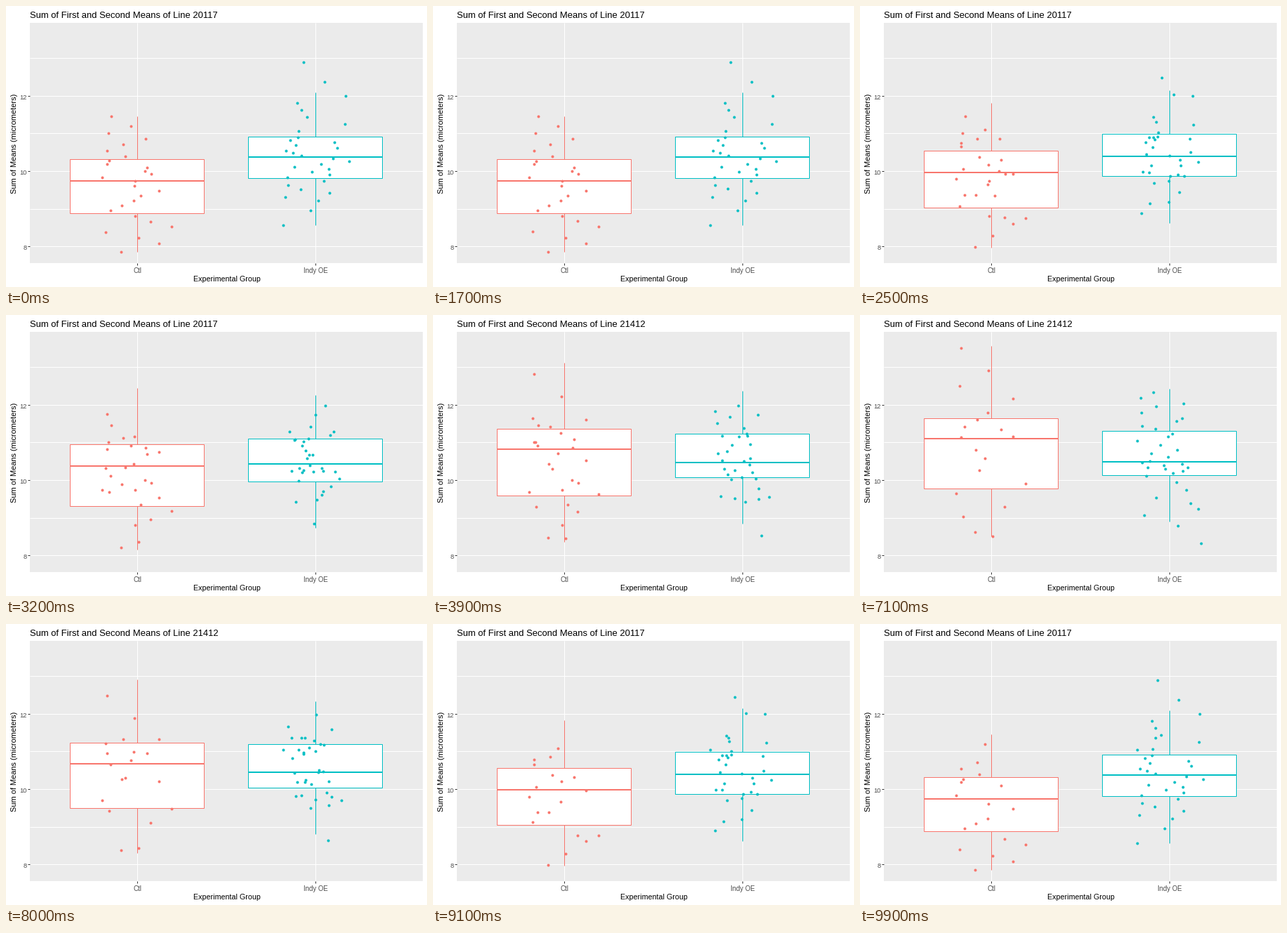
Animation of 600 by 400 pixels, one loop 10 s. Source, as a matplotlib script:

```python
import numpy as np
import matplotlib.pyplot as plt
from matplotlib.animation import FuncAnimation
from matplotlib.patches import Rectangle

W, H, DPI = 600, 400, 100
PX = 72 / DPI  # one pixel in points
FRAMES, INTERVAL = 100, 100
RED, TEAL, DARK, GREY = "#F8766D", "#00BFC4", "#333333", "#4D4D4D"
LINES = (20117, 21412)
JITTER = 50

# Pixel heights: reach, whisker, quartile, median, quartile, whisker, reach
SHARE = (0, 0.05, 0.25, 0.5, 0.75, 0.95, 1)
CTL = ((157, 175, 218, 249, 295, 335, 350),
       (40, 70, 144, 173, 245, 309, 314))
INDY = ((80, 123, 186, 215, 245, 280, 312),
        (104, 121, 164, 209, 227, 293, 327))

plt.rcParams["font.family"] = "Liberation Sans"
rng = np.random.default_rng(20)

fig = plt.figure(figsize=(W / DPI, H / DPI), dpi=DPI, facecolor="white")
ax = fig.add_axes([0, 0, 1, 1])
ax.set_xlim(0, W)
ax.set_ylim(H, 0)
ax.axis("off")


def line(xs, ys, color, width=1, z=1):
    return ax.plot(xs, ys, color=color, lw=width * PX, zorder=z,
                   solid_capstyle="butt")[0]


def label(x, y, s, size, color="black", **kw):
    return ax.text(x, y, s, fontsize=size * PX, color=color, **kw)


def mix(a, b, s):
    return a + (b - a) * s


def cloud(x, levels, jitter):
    """Points spread over the levels by quantile, in shuffled order."""
    share = np.linspace(0, 1, len(jitter))
    y = rng.permutation(np.interp(share, SHARE, levels))
    return np.column_stack([x + jitter, y])


class Group:
    """Box plot with its points, blending between two states."""

    def __init__(self, x, color, levels, whiskers, jitters):
        left, right = x - 96, x + 95
        self.points = [cloud(x, v, j) for v, j in zip(levels, jitters)]
        self.shared = min(map(len, jitters))
        self.levels = np.array([(w[0], *v[2:5], w[1])
                                for v, w in zip(levels, whiskers)], float)
        self.whisker = line([x, x], [0, 0], color, z=2)
        self.body = Rectangle((left, 0), right - left, 1, fc="white",
                              ec=color, lw=PX, zorder=3)
        ax.add_patch(self.body)
        self.median = line([left, right], [0, 0], color, 2, 4)
        self.dots = ax.plot([], [], "o", ms=4 * PX, mfc=color, mec="none",
                            zorder=5)[0]

    def update(self, s, state):
        top, q3, med, q1, low = mix(*self.levels, s)
        self.whisker.set_ydata([top, low])
        self.body.set_y(q3)
        self.body.set_height(q1 - q3)
        self.median.set_ydata([med, med])
        # Unpaired points stay still while their own state is active
        n = self.shared
        first, second = self.points
        moving = mix(first[:n], second[:n], s)
        self.dots.set_data(*np.vstack([moving, self.points[state][n:]]).T)


# Panel, grid and axes
ax.add_patch(Rectangle((34, 24), 560, 342, fc="#EBEBEB", lw=0, zorder=0))
for y in (74, 181, 289):
    line([34, 594], [y, y], "white")
for y, s in ((128, "12"), (235, "10"), (342, "8")):
    line([34, 594], [y, y], "white")
    line([31, 34], [y, y], DARK)
    label(29.5, y + 4.8, s, 9.3, GREY, ha="right")
for x, s in ((187, "Ctl"), (441, "Indy OE")):
    line([x, x], [24, 366], "white")
    line([x, x], [366, 369], DARK)
    label(x, 380.5, s, 9.6, GREY, ha="center")
label(314.5, 392.5, "Experimental Group", 10.6, ha="center")
label(17, 196, "Sum of Means (micrometers)", 11, rotation=90,
      ha="right", va="center")
title = label(34, 17, "", 13)

# One jitter stream serves both groups; its split differs per state
jitter = rng.uniform(-JITTER, JITTER, 59)
ctl = Group(187, RED, CTL, ((157, 350), (40, 314)),
            (jitter[:27], jitter[:19]))
indy = Group(441, TEAL, INDY, ((123, 312), (104, 293)),
             (jitter[27:59], jitter[19:53]))


def phase(k):
    """Linear progress from the first state (0) to the second (1)."""
    if k < 50:
        return max(0, (k - 16) / 34)
    return 1 - max(0, (k - 67) / 33)


def update(k):
    t = phase(k)
    s = (1 - np.cos(np.pi * t)) / 2
    for group in (ctl, indy):
        group.update(s, int(k >= 50))
    title.set_text(f"Sum of First and Second Means of Line {LINES[t > 0.5]}")
    return []


anim = FuncAnimation(fig, update, frames=FRAMES, interval=INTERVAL,
                     init_func=lambda: [], repeat=True, repeat_delay=0)
plt.show()
```
